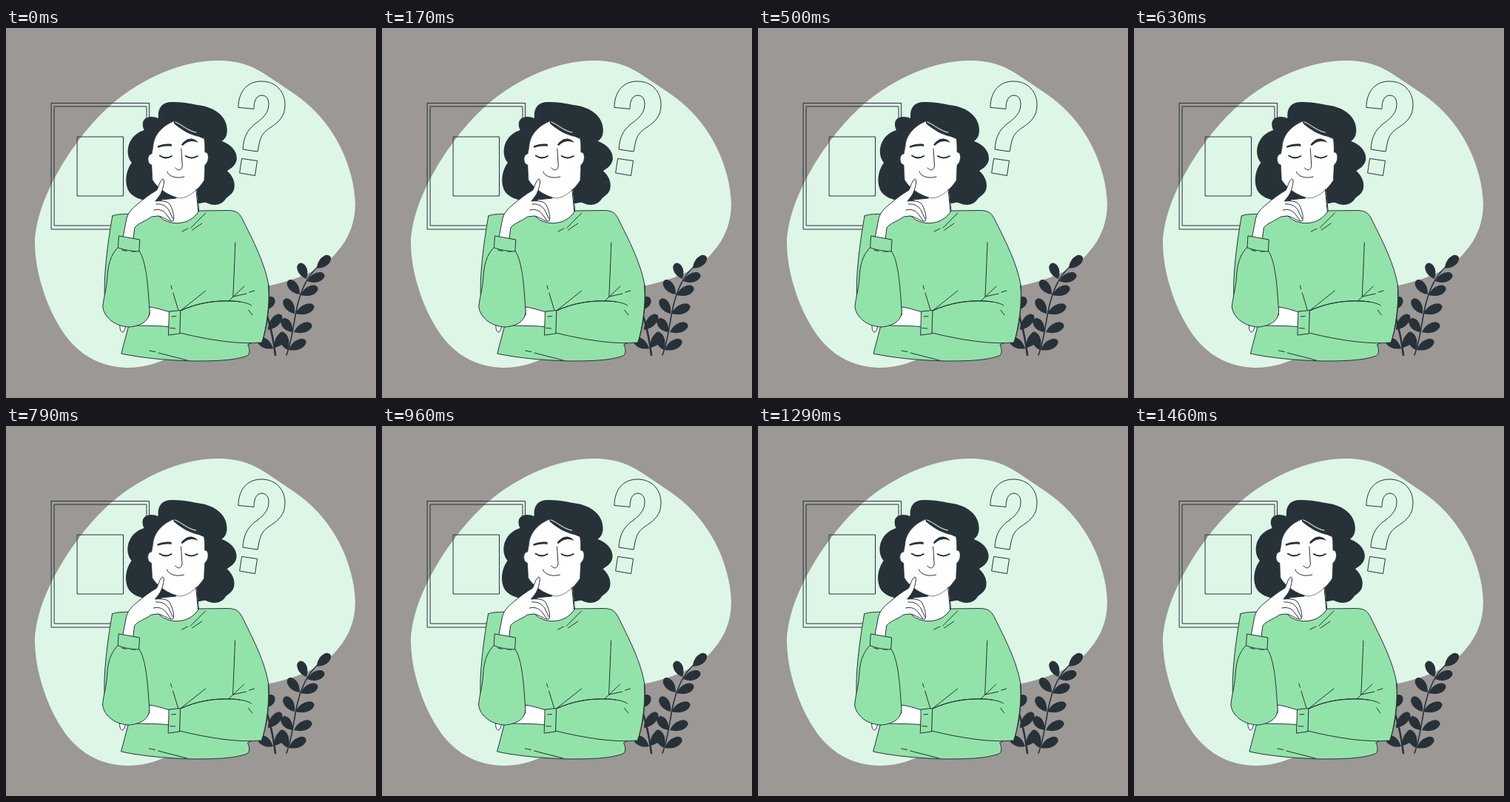
An HTML page for the animation above (1500 ms loop, 500 px wide and 500 px high).

```html
<!DOCTYPE html>
<html lang="en">
<head>
<meta charset="utf-8">
<title>Thinking</title>
<style>
  html, body { margin: 0; width: 100%; height: 100%; overflow: hidden; background: #9b9896; }
  svg { display: block; width: 100vw; height: 100vh; }
  .line { fill: none; }
  .green { fill: #92e3a9; }
  .skin { fill: #fff; }
  .dark { fill: #263238; stroke: none; }
  .thick { stroke-width: 2; }
</style>
</head>
<body>
<svg viewBox="0 0 500 500" stroke="#263238" stroke-width="1" stroke-linecap="round" stroke-linejoin="round">
  <rect width="500" height="500" fill="#9b9896" stroke="none"/>
  <path fill="#def6e6" stroke="none" d="M287 44C233 44 175 72 133 112C93 150 39 230 39 293C40 340 62 396 88 425C110 449 137 459 167 459C212 458 245 433 280 400C302 378 326 357 357 348C392 340 427 328 447 303C464 284 472 262 472 237C470 187 446 138 411 106C395 91 374 79 357 67C337 53 317 44 287 44Z"/>

  <g class="line">
    <rect x="61.5" y="101.5" width="132" height="170.5"/>
    <rect x="65.5" y="106" width="124.500" height="161"/>
    <rect x="96.500" y="147" width="62" height="80"/>
    <path d="M314 107C314 86 326 72 345 72C365 72 377 86 377 104C377 119 369 127 358 134C347 141 344 147 342 157L340 167L320 164C321 149 325 139 336 130C347 122 355 115 355 103C355 95 351 91 346 91C338 91 335 99 335 109Z"/>
    <path d="M319 176.500L339.500 179.500L336.500 199.500L316 196Z"/>
  </g>

  <g id="plants">
    <path class="line" stroke-width="1.600" d="M379 442C386 424 388 404 392 383C397 358 405 337 421 323"/>
    <path class="line" stroke-width="2.500" d="M364 442C362 425 357 400 350 380"/>
  </g>

  <g id="woman">
    <path class="dark" d="M206 118C206 106 213 99 227 100C240 100 253 103 265 105C286 109 299 122 299 138C299 146 296 150 292 153C304 157 312 166 312 176C312 185 304 190 299 193C307 200 311 210 308 219C305 226 300 227 297 231C292 239 282 241 273 237C268 234 265 237 260 237L240 236L205 234C190 235 174 231 167 222C160 212 161 194 170 182C163 174 163 160 170 150C175 143 181 140 187 138C184 132 184 125 189 122C194 119 202 120 206 122Z"/>

    <path class="skin" d="M230 228L258 216L261 249L258 270L208 266L210 232L230 230Z"/>
    <path class="green" d="M144 254C150 251 158 252 168 251L207 254C218 267 248 269 261 247L301 246.500C312 247 316 250 321 261C336 291 350 319 355 347C357 372 352 402 347 418L327 428C330 434 330 441 326 443C307 450 278 450 252 450C217 449 184 446 156 440L166 402L134 370C131 338 138 288 144 254Z"/>

    <path class="skin" d="M199 160C200 144 212 132 227 126C237 133 250 141 267 146C269 152 269 160 269 168C275 167 275 181 269 185L268 206C261 217 247 230 235 230C220 227 204 216 198 205L197 185C191 184 190 171 197 170Z" stroke-width=".6"/>
    <path class="dark" d="M227 129C237 138 250 145 261 147L268 150L267 145C253 143 238 134 227 126Z"/>
    <path class="line" stroke="#fff" d="M229 127C239 131 246 139 257 141"/>
    <path class="dark" d="M205 159.500C211 157 218 156 224 157L224 160C217 159 211 160 205 162ZM237 158C241 152 246 149 251 149.500C255 150 258 152 260 155C252 151 245 153 239 159Z"/>
    <path class="line thick" d="M208 172.500Q216 178 224 173M243 173Q251 178 259 173"/>
    <path class="line" d="M237 163L238.500 187C237 192 234 194 229 189M218 194C220 201 231 204 241 201M257 218L260 248"/>

    <g class="line">
      <path d="M270 250L250 270M265 264L252 273M238 275L246 271"/>
      <path d="M223 348L224.500 353M226 358L233 381M270 355L236 382"/>
      <path d="M310 290C309 317 308 340 307 363"/>
      <path d="M194 436L202 437.500M206 439L245 449"/>
    </g>

    <path class="skin" d="M194 377C203 378 212 381 222 384L221 404C208 402 197 403 177 402L194 388ZM154 402C154 407 155 411 158 411C160 410 161 406 162 403Z"/>
    <path class="green" d="M236 382C260 371 283 368 307 369C320 370 328 372 332 375L355 350C357 377 353 405 346 425C316 428 276 422 235 412Z"/>
    <path class="green" stroke="none" d="M316 368L354 345L355 376L330 395Z"/>
    <path class="line" d="M236 382C260 371 283 368 307 369C320 370 328 372 332 375M301 369L322 349M307 363L325 359M329 357L336 355M328 381L333 388M355 347C357 372 352 407 346 425"/>
    <path class="green" d="M221 383L236 381.500L235 413L220 415Z"/>
    <path class="line" d="M224 390L230 389.500M222 405.500L229 406"/>

    <path class="skin" d="M158 284L163 258C165 250 170 244 178 238C186 231 194 225 204 219C207 213 209 204 212.500 204C215 205 213 214 211 220C209 226 205 230 202 234C211 233 219 234 222 239C227 249 228 258 226 261C220 262 213 255 206 254L197 255C189 261 178 264 174 270L172 287Z"/>
    <path class="line" d="M203 238C211 237 219 241 222 250L226 258M200 246C207 244 214 247 217 252L223 260"/>
    <path class="green" d="M152 296C141 307 138 320 137 338C136 353 132 364 131 377C133 392 149 404 168 404C185 402 196 394 194 379C192 350 190 315 180 301Z"/>
    <path class="green" d="M153 281L181 286L180 302C171 302 160 300 152 297Z"/>
    <path class="line" d="M157 300L163 301.500M170 302L175 302"/>
  </g>
</svg>
<script>
const NS = "http://www.w3.org/2000/svg";
const plants = document.getElementById("plants");
const woman = document.getElementById("woman");

// base x, base y, tip x, tip y
const leaves = [
  [420, 325, 438, 309], [406, 339, 397, 318], [407, 342, 430, 334],
  [397, 360, 382, 341], [398, 361, 421, 351], [390, 386, 377, 366],
  [391, 386, 416, 376], [387, 411, 374, 393], [389, 411, 413, 401],
  [381, 435, 372, 411], [382, 435, 405, 423], [351, 381, 361, 364],
  [354, 408, 372, 388], [361, 433, 341, 420], [363, 432, 377, 413]
];

function addLeaf([x, y, tx, ty]) {
  const len = Math.hypot(tx - x, ty - y);
  const turn = Math.atan2(ty - y, tx - x) * 180 / Math.PI;
  const leaf = document.createElementNS(NS, "path");
  leaf.setAttribute("class", "dark");
  leaf.setAttribute("d", `M0 0C${len * .3} -7 ${len * .65} -8 ${len * .9} -5C${len * 1.05} -2 ${len * 1.05} 2 ${len * .9} 4C${len * .65} 8 ${len * .3} 6 0 0Z`);
  leaf.setAttribute("transform", `translate(${x} ${y}) rotate(${turn})`);
  plants.append(leaf);
}
leaves.forEach(addLeaf);

// sideways shake, one value per tenth of the loop
const LOOP = 1500, STEP = LOOP / 36, LEAD = 25;
const shake = [0, -1, 2, -4, 4, -4, 4, -4, 2, -1, 0];

function offset(ms) {
  const p = ms % LOOP / LOOP * 10;
  const i = Math.floor(p);
  return shake[i] + (shake[i + 1] - shake[i]) * (p - i);
}

function draw(ms) {
  const tick = Math.floor((ms % LOOP + 4) / STEP);
  woman.setAttribute("transform", `translate(${offset(tick * STEP + LEAD).toFixed(3)} 0)`);
}

let start;
function loop(now) {
  start ??= now;
  draw(now - start);
  requestAnimationFrame(loop);
}
draw(0);
requestAnimationFrame(loop);
</script>
</body>
</html>
```
